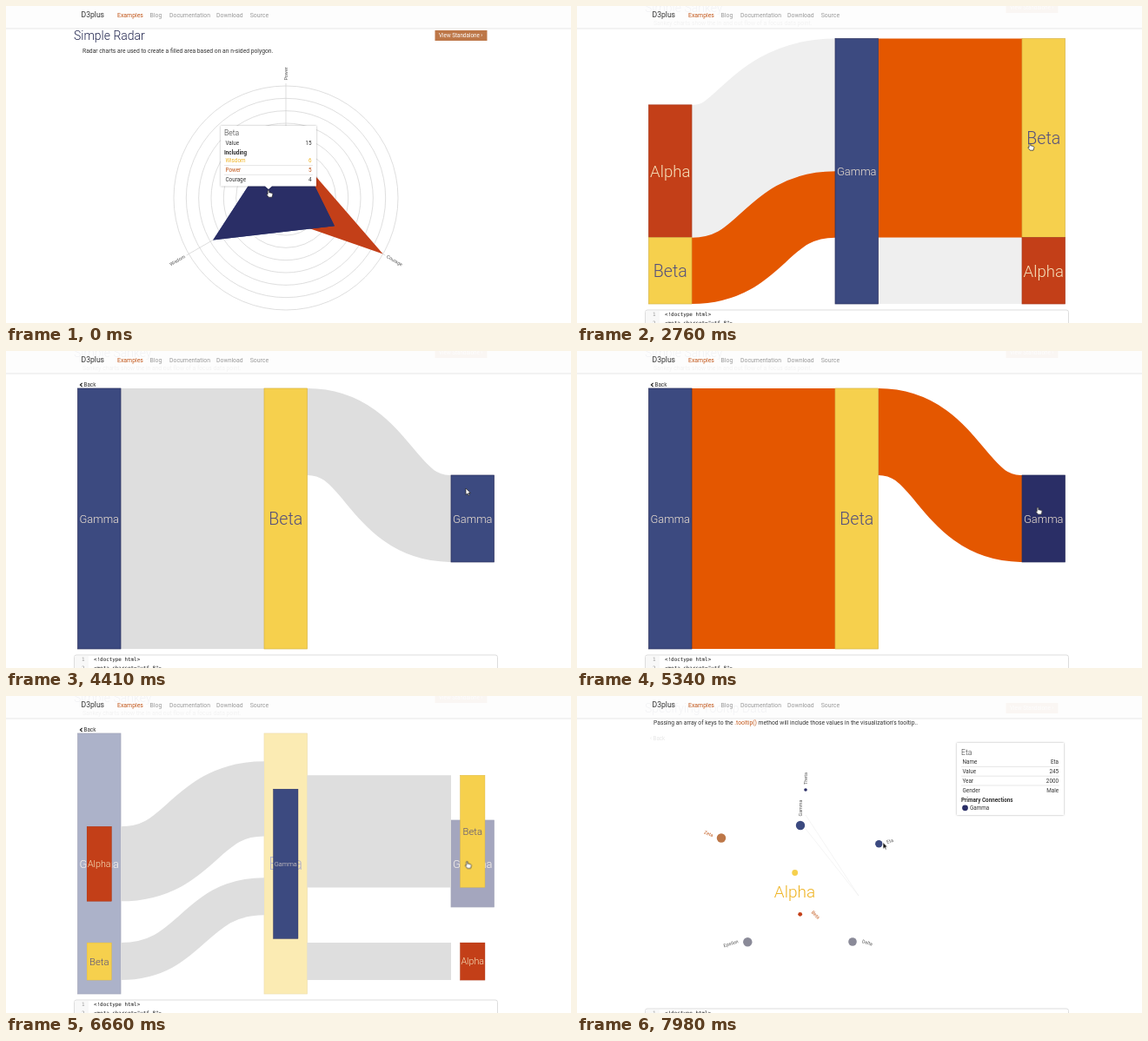
An HTML page that plays this animation: 650 px wide and 365 px high, repeating every 8000 ms.

```html
<!DOCTYPE html>
<html lang="en">
<head>
<meta charset="utf-8">
<title>D3plus examples</title>
<style>
  html, body { margin: 0; width: 100%; height: 100%; overflow: hidden; background: #fff; }
  svg { display: block; width: 100vw; height: 100vh; }
  text { font: 300 6.9px Roboto, "Liberation Sans", sans-serif; fill: #333; }
  .title { font-size: 14px; fill: #22264f; }
  .desc { font-weight: 400; font-size: 6.75px; }
  .small { font-size: 6.3px; font-weight: 400; }
  .axis { font-size: 5.4px; fill: #555; font-weight: 400; }
  .bold { font-weight: 700; }
  .code { font: 5.9px "DejaVu Sans Mono", monospace; fill: #111; }
  .ring { fill: none; stroke: #d0d0d0; stroke-width: .7; }
  .rule { stroke: #ddd; stroke-width: .7; }
  .card { fill: #fff; filter: drop-shadow(0 .7px 1.3px #0005); }
  .link { fill: none; stroke: #dedede; stroke-width: var(--w); }

  /* One 8 s clock drives everything; 1% = 80 ms. */
  .scene, .step { animation: 8s step-end infinite; }
  #radar { animation-name: radar; }
  #sankey { animation-name: sankey; }
  #network { animation-name: network; }
  @keyframes radar { 0% { opacity: 1 } 22.5%, 100% { opacity: 0 } }
  @keyframes sankey { 0% { opacity: 0 } 22.5% { opacity: 1 } 90%, 100% { opacity: 0 } }
  @keyframes network { 0% { opacity: 0 } 90%, 100% { opacity: 1 } }

  .early { animation-name: early; }
  .late { animation-name: late; }
  @keyframes early { 0% { opacity: 1 } 8.6%, 100% { opacity: 0 } }
  @keyframes late { 0% { opacity: 0 } 8.6%, 100% { opacity: 1 } }

  .move { animation: move 8s ease-in-out infinite; }
  @keyframes move {
    0%, .5% { transform: translate(302px, 212px) }
    12%, 22.49% { transform: translate(383px, 232.5px) }
    22.5% { transform: translate(480px, 190px) }
    28%, 41% { transform: translate(521px, 158px) }
    48%, 60% { transform: translate(529px, 158px) }
    70%, 79% { transform: translate(530.5px, 186px) }
    84%, 89.99% { transform: translate(530.5px, 190.5px) }
    90% { transform: translate(400px, 220px) }
    94.5%, 100% { transform: translate(352px, 168.5px) }
  }
  .hand { animation-name: hand; }
  .arrow { animation-name: arrow; }
  .black { animation-name: network; }
  @keyframes hand { 0% { opacity: 1 } 45% { opacity: 0 } 62% { opacity: 1 } 90%, 100% { opacity: 0 } }
  @keyframes arrow { 0% { opacity: 0 } 45% { opacity: 1 } 62%, 100% { opacity: 0 } }

  /* Flow chart: overview, focus on Beta, focus on Gamma */
  .hot, .cold, .hotLater, .darken { animation: 8s linear infinite; }
  .hot { animation-name: hot; }
  .cold { animation-name: cold; }
  .hotLater { animation-name: hotLater; }
  .darken { animation-name: darken; }
  @keyframes hot { 0%, 28.2% { stroke: #dedede } 28.9%, 100% { stroke: #e45700 } }
  @keyframes cold { 0%, 28.2% { stroke: #dedede } 28.9%, 100% { stroke: #efefef } }
  @keyframes darken { 0%, 62% { fill: #3c4a80 } 62.7%, 100% { fill: #2a2e66 } }

  #overview, #beta .nodes, #overview .links, #beta .links { animation: 8s linear infinite; }
  #overview { animation-name: leaveFirst; }
  #overview .links { animation-name: fadeFirst; }
  #beta .nodes { animation-name: leaveSecond; }
  #beta .links { animation-name: fadeSecond; }
  @keyframes leaveFirst {
    0%, 41.3% { opacity: 1; animation-timing-function: cubic-bezier(.65, 0, .35, 1) }
    53%, 100% { opacity: 0 }
  }
  @keyframes leaveSecond {
    0%, 77.1% { opacity: 1; animation-timing-function: cubic-bezier(.65, 0, .35, 1) }
    88.8%, 100% { opacity: 0 }
  }
  @keyframes fadeFirst { 0%, 40.7% { opacity: 1 } 43.1%, 100% { opacity: 0 } }
  @keyframes fadeSecond { 0%, 76.5% { opacity: 1 } 78.9%, 100% { opacity: 0 } }

  .node { transform-box: fill-box; transform-origin: center; }
  #beta .node, #beta .link, #gamma .node, #gamma .link {
    animation: 8s cubic-bezier(.65, 0, .35, 1) infinite;
  }
  #beta .node { animation-name: popFirst; }
  #gamma .node { animation-name: popSecond; }
  #beta .link { animation-name: growFirst, hotLater; }
  #gamma .link { animation-name: growSecond; }
  #beta .darken { animation: darken 8s linear infinite; }
  @keyframes popFirst { 0%, 41.3% { transform: scale(0) } 53%, 100% { transform: scale(1) } }
  @keyframes popSecond { 0%, 77.1% { transform: scale(0) } 88.8%, 100% { transform: scale(1) } }
  @keyframes growFirst { 0%, 41.3% { stroke-width: 0 } 53%, 100% { stroke-width: var(--w) } }
  @keyframes growSecond { 0%, 77.1% { stroke-width: 0 } 88.8%, 100% { stroke-width: var(--w) } }
  @keyframes hotLater { 0%, 62% { stroke: #dedede } 62.7%, 100% { stroke: #e45700 } }
  .back { animation: back 8s linear infinite; }
  @keyframes back { 0%, 41.3% { opacity: 0 } 45%, 100% { opacity: 1 } }

  .hover { animation-name: hover; }
  @keyframes hover { 0% { opacity: 0 } 94.3%, 100% { opacity: 1 } }
  .edges { animation: edges 8s linear infinite; }
  .return { animation: return 8s linear infinite; }
  @keyframes edges { 0%, 97.5% { opacity: 1 } 99.8%, 100% { opacity: .45 } }
  @keyframes return { 0%, 98.5% { opacity: 0 } 99.8%, 100% { opacity: .12 } }
</style>
</head>
<body>
<svg id="stage" viewBox="0 0 650 365"></svg>
<script>
const NAVY = '#3c4a80', DARK = '#2a2e66', RED = '#c33f18', YELLOW = '#f6d04d',
      BROWN = '#bd7748', RUST = '#c2571a', GOLD = '#efb321', GREY = '#8a8a98';

const text = (x, y, s, cls = '', attrs = '') =>
  `<text x="${x}" y="${y}" class="${cls}" ${attrs}>${s}</text>`;
const rect = (x, y, w, h, attrs = '') =>
  `<rect x="${x}" y="${y}" width="${w}" height="${h}" ${attrs}/>`;
const line = (x1, y1, x2, y2, cls = 'rule') =>
  `<line x1="${x1}" y1="${y1}" x2="${x2}" y2="${y2}" class="${cls}"/>`;
const fill = color => `style="fill:${color}"`;
const tilted = (x, y, angle, s, color = '#555') =>
  `<text class="axis" text-anchor="middle" dy=".35em" style="fill:${color}"
    transform="translate(${x} ${y}) rotate(${angle})">${s}</text>`;

const row = (y, left, right, [label, value, color = '#333']) =>
  text(left, y, label, 'small', fill(color)) +
  text(right, y, value, 'small', `text-anchor="end" ${fill(color)}`);

const intro = (y, title, desc) =>
  text(78, y + 39, title, 'title') + text(88, y + 53.7, desc, 'desc') +
  rect(493.5, y + 28, 60, 12, `fill="${BROWN}"`) +
  text(498, y + 36.3, 'View Standalone ›', 'small', fill('#fff'));

const codeBox = y =>
  rect(78.5, y, 487, 40, 'rx="2.5" fill="#fff" stroke="#ddd"') +
  rect(79, y + 1, 16, 40, 'fill="#f8f8f8"') +
  ['&lt;!doctype html&gt;', '&lt;meta charset="utf-8"&gt;'].map((s, i) =>
    text(90.5, y + 7 + i * 9.5, i + 1, 'code', `text-anchor="end" ${fill('#999')}`) +
    text(101, y + 7 + i * 9.5, s, 'code')).join('');

// Radar
const CX = 322, CY = 221, R = 129;
const spoke = (deg, r) => {
  const a = deg * Math.PI / 180;
  return [(CX + r * Math.cos(a)).toFixed(1), (CY + r * Math.sin(a)).toFixed(1)];
};
const AXES = [-90, 30, 150];
const shape = values => values.map((v, i) => spoke(AXES[i], v * R / 8)).join(' ');
const ALPHA = shape([4, 8, 2]), BETA = shape([5, 4, 6]);

const radarTip = (cls, name, color, total, rows) =>
  `<g class="step ${cls}"><g transform="translate(-55 -74)">
    <path class="card" d="M0 0H110V69.5H59L55 73L51 69.5H0Z"/>
    ${text(4, 11.2, name, '', `style="font-size:8.6px;fill:${color}"`)}
    ${row(21.5, 5.5, 104.5, ['Value', total])}
    ${text(4, 33.2, 'Including', 'small bold')}
    ${rows.map((r, i) => row(42.3 + i * 10.8, 5.5, 104.5, r) +
      (i ? line(4, 34.7 + i * 10.8, 106, 34.7 + i * 10.8) : '')).join('')}
  </g></g>`;

const radar = `
  ${intro(0, 'Simple Radar', 'Radar charts are used to create a filled area based on an n-sided polygon.')}
  ${Array.from({ length: 9 }, (_, i) =>
    `<circle cx="${CX}" cy="${CY}" r="${R * (i + 1) / 9}" class="ring"/>`).join('')}
  ${AXES.map(a => line(CX, CY, ...spoke(a, R + 3), 'ring')).join('')}
  ${tilted(322, 78, -90, 'Power')}${tilted(197, 293, -30, 'Wisdom')}${tilted(447, 293, 30, 'Courage')}
  <clipPath id="inner"><polygon points="${ALPHA}"/></clipPath>
  <polygon points="${ALPHA}" fill="${RED}"/>
  <polygon points="${BETA}" fill="${NAVY}"/>
  <polygon points="${BETA}" fill="${DARK}" clip-path="url(#inner)"/>
  <polygon points="${BETA}" fill="${DARK}" class="step early"/>
  <g class="move">
    ${radarTip('early', 'Beta', '#333', 15,
      [['Wisdom', 6, GOLD], ['Power', 5, RUST], ['Courage', 4]])}
    ${radarTip('late', 'Alpha', RUST, 14,
      [['Courage', 8], ['Power', 4, RUST], ['Wisdom', 2, GOLD]])}
  </g>`;

// Flow chart
const COLUMNS = [82.5, 297, 512], NODE = 49.5;
const LOOK = {
  Alpha: { color: RED, edge: '#a8371a', ink: '#f6e3bd', size: 18.6 },
  Beta: { color: YELLOW, edge: '#d8b445', ink: '#55507c', size: 19.6 },
  Gamma: { color: NAVY, edge: '#2a2e5c', ink: '#efe2d2', size: 12.9 },
};
const node = ([col, top, bottom, name, cls = '']) => {
  const { color, edge, ink, size } = LOOK[name], x = COLUMNS[col];
  return `<g class="node">
    ${rect(x, top, NODE, bottom - top, `class="${cls}" fill="${color}" stroke="${edge}" stroke-width=".7"`)}
    ${text(x + NODE / 2, (top + bottom) / 2, name, '',
      `text-anchor="middle" dy=".36em" style="font-size:${size}px;fill:${ink}"`)}
  </g>`;
};
// Links are thick strokes along a centre curve; a and b are its end heights.
const link = ([col, a, b, width, cls = '']) => {
  const x0 = COLUMNS[col] + NODE, x1 = COLUMNS[col + 1], mid = (x0 + x1) / 2;
  return `<path class="link ${cls}" style="--w:${width}px"
    d="M${x0} ${a}C${mid} ${a} ${mid} ${b} ${x1} ${b}"/>`;
};
const flow = (id, links, nodes) => `<g id="${id}">
  <g class="links">${links.map(link).join('')}</g>
  <g class="nodes">${nodes.map(node).join('')}</g></g>`;

const gammaFlow = (id, top, hot = '', cold = '') => {
  const q = (343 - top) / 4, at = n => top + q * n;
  return flow(id,
    [[0, at(2), at(1), 2 * q, cold], [0, at(3.5), at(2.5), q, hot],
     [1, at(1.5), at(1.5), 3 * q, hot], [1, at(3.5), at(3.5), q, cold]],
    [[0, at(1), at(3), 'Alpha'], [0, at(3), 343, 'Beta'], [1, top, 343, 'Gamma'],
     [2, top, at(3), 'Beta'], [2, at(3), 343, 'Alpha']]);
};

const sankey = `
  ${intro(-32, 'Simple Sankey', 'Sankey charts show the in and out flow of a focus data point.')}
  ${gammaFlow('overview', 37.5, 'hot', 'cold')}
  ${flow('beta', [[0, 193, 193, 300], [1, 93, 193, 100]],
    [[0, 43, 343, 'Gamma'], [1, 43, 343, 'Beta'], [2, 143, 243, 'Gamma', 'darken']])}
  ${gammaFlow('gamma', 43.5)}
  <g class="back">
    <path d="M87.6 36.8L85.4 39L87.6 41.2" fill="none" stroke="#222" stroke-width="1.2"/>
    ${text(89.5, 41.2, 'Back', 'small')}
  </g>
  ${codeBox(350)}`;

// Network
const dots = [
  [263, 108, 1.8, DARK], [257, 149, 5.2, NAVY], [347.3, 170.3, 4.2, NAVY],
  [166, 163.5, 5.2, BROWN], [250.7, 203.5, 3.4, YELLOW], [256.7, 251.3, 2.4, RED],
  [196.3, 283.3, 5.2, GREY], [317, 283, 4.8, GREY],
];
const facts = [['Name', 'Eta'], ['Value', 245], ['Year', 2000], ['Gender', 'Male']];
const network = `
  ${intro(-20, 'Specifying Tooltip Data', '')}
  ${text(88, 32.6, `Passing an array of keys to the <tspan ${fill(RUST)}>.tooltip()</tspan> method will include those values in the visualization's tooltip..`, 'desc')}
  <g class="return">${text(84, 50.5, '‹ Back', 'small')}</g>
  <g class="edges">${line(263, 137, 324, 230)}${line(263, 153, 324, 230)}</g>
  ${dots.map(([x, y, r, c]) => `<circle cx="${x}" cy="${y}" r="${r}" fill="${c}"/>`).join('')}
  ${tilted(263, 95, -90, 'Theta')}${tilted(257, 129, -90, 'Gamma')}
  ${tilted(151.5, 158.5, 22, 'Zeta', RUST)}${tilted(360, 167, -17, 'Eta')}
  ${tilted(274.5, 252, 45, 'Beta', RUST)}${tilted(177, 285, -18, 'Epsilon')}
  ${tilted(334, 284, 17, 'Delta')}
  ${text(250.5, 232, 'Alpha', '', `text-anchor="middle" style="font-size:19px;fill:${GOLD}"`)}
  <g class="step hover">
    ${rect(437, 54, 123, 83, 'class="card"')}
    ${text(442, 68, 'Eta', '', 'style="font-size:8.6px"')}
    ${facts.map((f, i) => row(78.2 + i * 10.8, 443.5, 554, f) +
      (i ? line(442, 70.6 + i * 10.8, 555, 70.6 + i * 10.8) : '')).join('')}
    ${text(442, 122.4, 'Primary Connections', 'small bold')}
    <circle cx="446.5" cy="128.8" r="3.4" fill="${DARK}"/>
    ${text(452, 131.2, 'Gamma', 'small')}
  </g>
  ${codeBox(360)}`;

const menu = [[128, 'Examples', RUST], [165.5, 'Blog'], [188, 'Documentation'],
  [242, 'Download'], [280.7, 'Source']];
const header = `
  ${rect(0, 0, 650, 26, 'fill="#fdfdfd" fill-opacity=".95"')}
  ${line(0, 26, 650, 26)}
  ${text(86.5, 13.4, 'D3plus', '', 'style="font-size:8.6px;font-weight:400"')}
  ${menu.map(([x, s, c = '#999']) => text(x, 13.2, s, '', `style="font-weight:400;fill:${c}"`)).join('')}`;

const ARROW = 'M0 0V7.6L1.8 6L3 8.6L4.2 8L3 5.6H5.4Z';
const cursor = `<g class="move" stroke-width=".7" stroke-linejoin="round">
  <path class="step hand" fill="#fff" stroke="#222"
    d="M-.9 .6Q0 -.4 .8 .6V3L2 2.9L4.2 3.6Q5 4 4.8 5.4L4 8.2H.2L-2.2 5Q-2 3.9 -.9 4.8Z"/>
  <path class="step arrow" fill="#fff" stroke="#222" d="${ARROW}"/>
  <path class="step black" fill="#111" stroke="#fff" d="${ARROW}"/>
</g>`;

const scene = (id, body) => `<g id="${id}" class="scene">${body}</g>`;
document.getElementById('stage').innerHTML =
  scene('radar', radar) + scene('sankey', sankey) + scene('network', network) + header + cursor;
</script>
</body>
</html>
```
